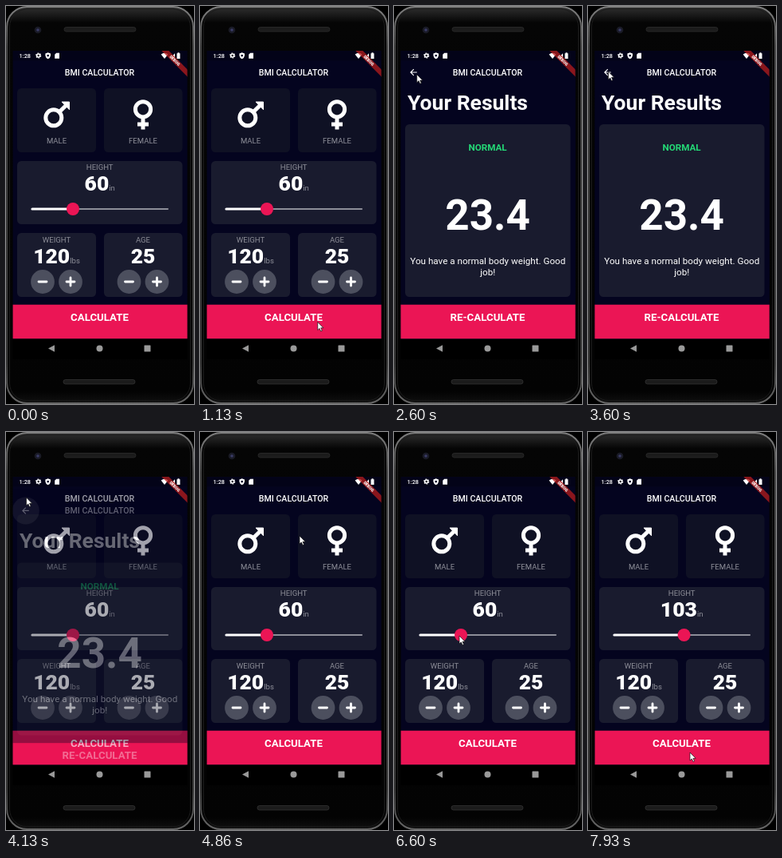
Animation, 236 px wide and 498 px high, one loop 8000 ms. Source, as an HTML page:

```html
<!DOCTYPE html>
<html lang="en">
<head>
<meta charset="utf-8">
<title>BMI calculator</title>
<style>
html, body { margin: 0; width: 100%; height: 100%; overflow: hidden; background: #000; }
svg { display: block; width: 100vw; height: 100vh; font-family: Roboto, sans-serif; }
.mid text { text-anchor: middle; }
.bar { font-size: 10.6px; font-weight: 500; fill: #fff; }
.label { font-size: 9.55px; font-weight: 400; fill: #8d8e98; }
.num { font-size: 26.5px; font-weight: 900; fill: #fff; }
.cta { font-size: 13.26px; font-weight: 700; fill: #fff; }
.body { font-size: 11.67px; fill: #fff; }
.bg { fill: #04041f; }
.dim { fill: #0f1124; }
.card { fill: #191b2e; }
.pink { fill: #eb1555; }
</style>
</head>
<body>
<svg viewBox="0 0 236 498" preserveAspectRatio="xMidYMid meet">
  <defs>
    <clipPath id="page"><rect x="8.600" y="56" width="219" height="360.400"/></clipPath>
    <linearGradient id="shell" x2="0" y2="1">
      <stop offset="0" stop-color="#303030"/>
      <stop offset=".04" stop-color="#050505"/>
      <stop offset=".97" stop-color="#030303"/>
      <stop offset="1" stop-color="#101010"/>
    </linearGradient>
    <linearGradient id="rim" x2="0" y2="1">
      <stop offset="0" stop-color="#808080"/>
      <stop offset=".1" stop-color="#484848"/>
      <stop offset=".9" stop-color="#3c3c3c"/>
      <stop offset="1" stop-color="#666"/>
    </linearGradient>
    <g id="round">
      <circle r="14.9" fill="#4c4f5e"/>
      <path d="M-5 0H5" stroke="#fff" stroke-width="2.8" stroke-linecap="round"/>
    </g>
  </defs>

  <!-- Phone -->
  <rect x="1.200" y="1" width="233.800" height="496" rx="25" fill="url(#shell)" stroke="url(#rim)" stroke-width="2"/>
  <rect x="4.500" y="4" width="227" height="490" rx="22" fill="none" stroke="#1c1c1c"/>
  <rect x="73" y="26.500" width="90" height="5.500" rx="2.700" fill="#1b1b1b" stroke="#303030" stroke-width=".7"/>
  <rect x="72" y="467.500" width="90" height="5.500" rx="2.700" fill="#1b1b1b" stroke="#383838" stroke-width=".7"/>
  <circle cx="40" cy="30" r="4.300" fill="#1a1b26"/>
  <circle cx="40" cy="30" r="1.800" fill="#3a3b66"/>
  <rect x="8.600" y="416" width="219" height="26"/>
  <g fill="#999">
    <path d="M53 428.500L61 424.200V432.800Z"/>
    <circle cx="117.500" cy="428.500" r="4"/>
    <rect x="173.500" y="424.500" width="8" height="8" rx=".5"/>
  </g>

  <g clip-path="url(#page)">
    <g class="mid">
      <rect class="bg" x="8" y="56" width="220" height="361"/>
      <text class="bar" x="117.500" y="87">BMI CALCULATOR</text>
      <rect class="dim" x="14" y="103" width="99" height="80" rx="5.300"/>
      <rect class="dim" x="123" y="103" width="98.500" height="80" rx="5.300"/>
      <rect class="card" x="14" y="194" width="207.500" height="79" rx="5.300"/>
      <rect class="card" x="14" y="284" width="99" height="80" rx="5.300"/>
      <rect class="card" x="123" y="284" width="98.500" height="80" rx="5.300"/>

      <g fill="none" stroke="#fff" stroke-width="5">
        <circle cx="59.800" cy="139.800" r="10"/>
        <path d="M66.500 133L75.500 124.200"/>
        <circle cx="172" cy="129.300" r="9.600"/>
        <path d="M172 138.500V154.500M165 148H179"/>
      </g>
      <path d="M70 120H79.500V129.700Z" fill="#fff" stroke="#fff" stroke-linejoin="round"/>
      <text class="label" x="63.500" y="171.500">MALE</text>
      <text class="label" x="172" y="171.500">FEMALE</text>

      <text class="label" x="117.700" y="205.400">HEIGHT</text>
      <text class="num" x="117.700" y="231.200"><tspan id="height">60</tspan><tspan class="label">in</tspan></text>
      <path d="M33 254H203" stroke="#8d8e98" stroke-width="2.100" stroke-linecap="round"/>
      <path id="track" stroke="#fff" stroke-width="3.200" stroke-linecap="round"/>
      <circle id="halo" class="pink" cy="254" r="16"/>
      <circle id="thumb" class="pink" cy="254" r="8"/>

      <text class="label" x="63.500" y="296.300">WEIGHT</text>
      <text class="num" x="63.500" y="322.400">120<tspan class="label">lbs</tspan></text>
      <text class="label" x="172" y="296.300">AGE</text>
      <text class="num" x="172" y="322.400">25</text>
      <use href="#round" x="46" y="345"/>
      <use href="#round" x="81" y="345"/>
      <use href="#round" x="154.500" y="345"/>
      <use href="#round" x="189.500" y="345"/>
      <path d="M81 340V350M189.500 340V350" stroke="#fff" stroke-width="2.800" stroke-linecap="round"/>

      <rect class="pink" x="8" y="373.700" width="220" height="42.700"/>
      <text class="cta" x="117.500" y="393.700">CALCULATE</text>
    </g>

    <g id="results" class="mid">
      <rect class="bg" x="8" y="56" width="220" height="361"/>
      <circle id="ripple" cx="24.800" cy="83" r="17" fill="#ccc"/>
      <path d="M28.800 83H21M24.800 79.100L20.900 83L24.800 86.900" fill="none" stroke="#fff" stroke-width="1.150"/>
      <text class="bar" x="117.500" y="87">BMI CALCULATOR</text>
      <text x="17" y="129.500" style="text-anchor:start" font-size="26.500" font-weight="700" fill="#fff">Your Results</text>
      <rect class="card" x="14" y="148" width="207.500" height="216" rx="5.300"/>
      <text x="117.600" y="181.300" font-size="11.670" font-weight="700" fill="#24d876">NORMAL</text>
      <text x="117.600" y="280" font-size="53" font-weight="700" fill="#fff">23.4</text>
      <text class="body" x="117.800" y="323">You have a normal body weight. Good</text>
      <text class="body" x="117.800" y="336.700">job!</text>
      <rect class="pink" x="8" y="373.700" width="220" height="42.700"/>
      <text class="cta" x="117.500" y="393.700">RE-CALCULATE</text>
    </g>

    <!-- Status bar -->
    <rect x="8" y="56" width="220" height="12.500" opacity=".22"/>
    <text x="16.500" y="65" font-size="7.400" font-weight="500" fill="#fff">1:28</text>
    <g fill="#fff">
      <circle cx="40.700" cy="62" r="2" fill="none" stroke="#fff" stroke-width="1.600"/>
      <circle cx="40.700" cy="62" r="3" fill="none" stroke="#fff" stroke-width="1.200" stroke-dasharray="1.570"/>
      <path d="M52.700 58.300L56 59.500V62Q55.700 65 52.700 66.200Q49.700 65 49.400 62V59.500Z"/>
      <circle cx="52.700" cy="62.100" r="1.300" fill="#04041f"/>
      <path d="M63.200 58.700H67V65.700H61.200V60.700Z"/>
      <path d="M194.600 60.500Q199 57 203.400 60.500L199 66Z"/>
      <path d="M205.500 66L212 59.200V66Z"/>
      <path d="M214.500 59.200H215.500V58.200H217.500V59.200H218.500V66H214.500Z"/>
    </g>
    <g transform="translate(227 56) rotate(45)">
      <rect x="-34" y="16" width="68" height="6.400" fill="#b71c1c" opacity=".75"/>
      <text x="-2" y="21" text-anchor="middle" font-size="5" font-weight="900" fill="#fff">DEBUG</text>
    </g>
  </g>

  <path id="cursor" d="M0 0V10L2.300 7.900L3.900 11.500L5.600 10.800L4 7.300H7.200Z" fill="#fff" stroke="#111" stroke-width=".7"/>
</svg>
<script>
const LOOP = 8000;
const el = id => document.getElementById(id);
const clamp = v => Math.min(1, Math.max(0, v));
const span = (t, from, length) => clamp((t - from) / length);
const smooth = p => p * p * (3 - 2 * p);

// Cubic Bezier easing, solved by bisection
function bezier(x1, y1, x2, y2) {
  const at = (a, b, s) => 3 * (1 - s) ** 2 * s * a + 3 * (1 - s) * s * s * b + s ** 3;
  return x => {
    let lo = 0, hi = 1;
    for (let i = 0; i < 24; i++) {
      const mid = (lo + hi) / 2;
      if (at(x1, x2, mid) < x) lo = mid; else hi = mid;
    }
    return at(y1, y2, (lo + hi) / 2);
  };
}
const slide = bezier(.4, 0, .2, 1);
const fade = bezier(.42, 0, 1, 1);

const thumbX = value => 33 + .85 * value;
const heightAt = t => 60 + 43 * smooth(span(t, 6650, 600));

// time, x, y of the pointer tip
const path = [
  [60, 178, 470], [850, 149, 398], [1330, 147, 394], [1950, 147, 394],
  [2540, 29, 86], [2800, 27, 84], [3660, 25.5, 82], [4250, 25.5, 82],
  [4730, 121, 126], [4860, 125, 130], [5600, 112, 185], [6450, 82, 255],
  [6650, 82, 255], [7250, 118.5, 255], [7380, 118.5, 255], [7900, 128, 401], [LOOP, 128, 401]
];

function pointer(t) {
  const i = path.findIndex(p => p[0] > t);
  const [a, b] = [path[i - 1], path[i]];
  const p = smooth((t - a[0]) / (b[0] - a[0]));
  return [1, 2].map(k => a[k] + (b[k] - a[k]) * p);
}

function draw(t) {
  const open = t < 3000 ? span(t, 1425, 300) : 1 - span(t, 3995, 300);
  el('results').setAttribute('opacity', fade(open));
  el('results').setAttribute('transform', `translate(0 ${90 * (1 - slide(open))})`);
  el('results').style.display = open > 0 ? '' : 'none';
  el('ripple').setAttribute('opacity', .2 * span(t, 3890, 100));

  const value = Math.round(heightAt(t));
  const x = thumbX(value);
  el('height').textContent = value;
  el('track').setAttribute('d', `M33 254H${x}`);
  el('thumb').setAttribute('cx', x);
  el('halo').setAttribute('cx', x);
  el('halo').setAttribute('opacity', .16 * span(t, 6640, 80) * (1 - span(t, 7260, 100)));

  const shown = t >= path[0][0];
  el('cursor').style.display = shown ? '' : 'none';
  if (shown) el('cursor').setAttribute('transform', `translate(${pointer(t)})`);
}

const start = performance.now();
function tick() {
  draw((performance.now() - start) % LOOP);
  requestAnimationFrame(tick);
}
tick();
</script>
</body>
</html>
```
